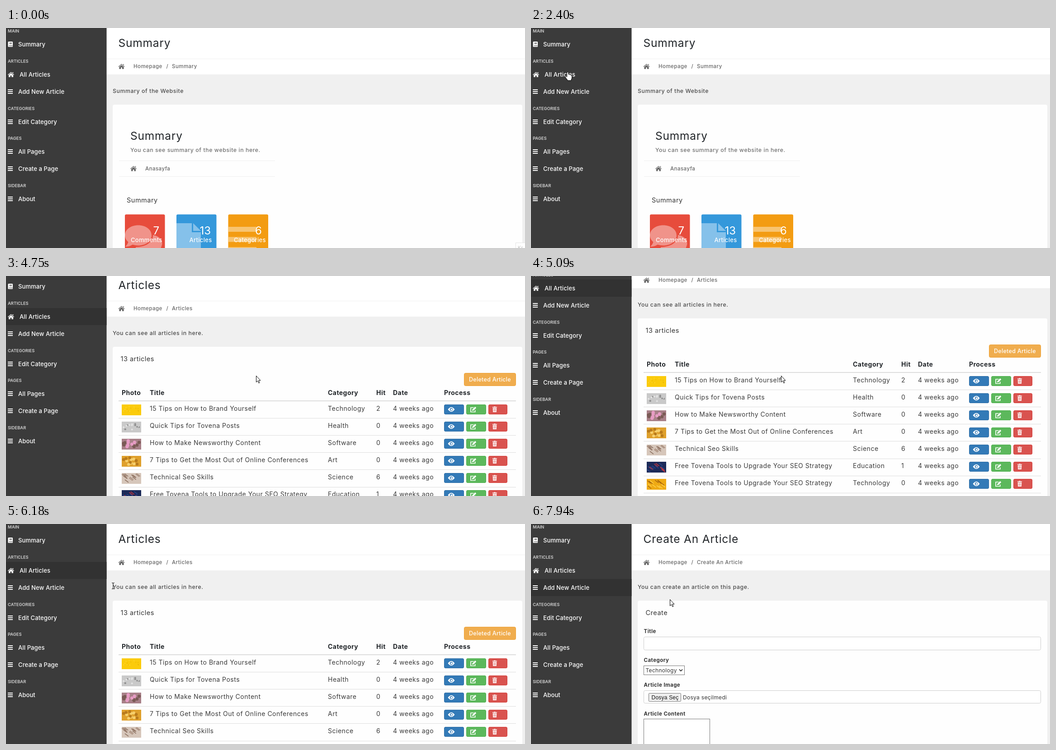
An HTML page that plays this animation: 1148 px wide and 488 px high, repeating every 8 s.

```html
<!DOCTYPE html>
<html lang="en">
<head>
<meta charset="utf-8">
<title>Article admin panel</title>
<style>
html, body { margin: 0; width: 100%; height: 100%; overflow: hidden; background: #f0f0f0; }
svg { display: block; }
text { font: 500 12.3px Inter, "Open Sans", sans-serif; letter-spacing: .57px; fill: #4a4a4a; }
.head { font-size: 24.5px; font-weight: 400; letter-spacing: .8px; fill: #212529; }
.crumb { font-size: 11.5px; letter-spacing: .45px; fill: #666; }
.sub { fill: #707070; }
.panel { font-size: 14.5px; font-weight: 400; letter-spacing: .5px; fill: #333; }
.nav { font-size: 13px; letter-spacing: .1px; fill: #fff; }
.group { font-size: 9.4px; font-weight: 600; letter-spacing: 0; fill: #d2d2d2; }
.count { font-size: 24px; font-weight: 400; letter-spacing: 0; fill: #fff; }
.tile { font-size: 13px; letter-spacing: .3px; fill: #fff; }
.btn { font-size: 12.5px; letter-spacing: .3px; fill: #fff; }
.th { font-size: 14px; font-weight: 700; letter-spacing: .45px; fill: #212529; }
.td { font-size: 14px; font-weight: 400; letter-spacing: .52px; fill: #3a3a3a; }
.label { font-size: 11.5px; font-weight: 700; letter-spacing: .45px; fill: #333; }
.field { font-size: 12px; font-weight: 400; letter-spacing: .3px; fill: #333; }
.file { font: 12px "Liberation Sans", Arial, sans-serif; letter-spacing: .2px; fill: #111; }
.faint { font-size: 10px; fill: #c8c8c8; }
.end { text-anchor: end; }
.mid { text-anchor: middle; }
</style>
</head>
<body>
<svg id="stage" width="1148" height="488" viewBox="0 0 1148 488"></svg>
<script>
const text = (cls, x, y, s) => `<text class="${cls}" x="${x}" y="${y}">${s}</text>`;
const rect = (x, y, w, h, fill, more = '') =>
  `<rect x="${x}" y="${y}" width="${w}" height="${h}" fill="${fill}" ${more}/>`;
const box = (x, y, w, h, stroke, r = 0, fill = '#fff') =>
  rect(x + .5, y + .5, w - 1, h - 1, fill, `stroke="${stroke}" rx="${r}"`);
const path = (d, fill, x = 0, y = 0, more = '') =>
  `<path d="${d}" fill="${fill}" transform="translate(${x} ${y})" ${more}/>`;
const group = (id, body) => `<g id="${id}">${body}</g>`;

const HOME = 'M0 6.4L7 .4L14 6.4L13.2 7.4L7 2.1L.8 7.4ZM10.4 1h1.8v2.8l-1.8-1.5ZM2 7.5L7 3.2L12 7.5V12H8.4V8.6H5.6V12H2Z';
const bars = y => [-5, -1, 3].map(d => rect(4, Math.floor(y) + d, 11, 2, '#fff')).join('');

// Sidebar
const links = [
  [36, 'Summary'], [103, 'All Articles'], [141, 'Add New Article'], [208, 'Edit Category'],
  [274.5, 'All Pages'], [312.5, 'Create a Page'], [379, 'About']
];
const groups = [[7, 'MAIN'], [74, 'ARTICLES'], [178.5, 'CATEGORIES'], [245, 'PAGES'], [350, 'SIDEBAR']];

function linkIcon(i, y) {
  if (i === 0) return rect(4.5, 30, 10.5, 12, '#fff', 'rx="1.5"') +
    rect(7.5, 32.5, 5.5, 1, '#3b3b3b') + rect(7.5, 34.5, 5.5, 1, '#3b3b3b') + rect(6.5, 39, 8, 1, '#3b3b3b');
  return i === 1 ? path(HOME, '#fff', 4, 97) : bars(y);
}

const sidebar = rect(0, 0, 222.5, 700, '#3b3b3b') +
  '<rect id="active" width="222.5" height="38" fill="#323232"/>' +
  groups.map(([y, s]) => text('group', 4, y + 3.4, s)).join('') +
  links.map(([y, s], i) => linkIcon(i, y) + text('nav', i === 1 ? 30 : 27, y + 4.6, s)).join('');

// Parts shared by every page
const frame = (title, intro) =>
  rect(222, 0, 926, 103, '#fff') + rect(222, 68, 926, 1, '#f0f0f0') +
  text('head', 248.5, 41.5, title) + path(HOME, '#666', 248.5, 79) +
  text('crumb', 282, 89.4, 'Homepage') + text('crumb', 354.5, 89.4, '/') + text('crumb', 367, 89.4, title) +
  text('', 236, 144.2, intro) + rect(236, 170, 906, 700, '#fefefe', 'rx="4"');

// Summary page
const tile = (x, color, icon, countX, count, labelX, label) =>
  rect(x, 413.5, 88.5, 90, color, 'rx="3"') + icon +
  text('count end', countX, 457.5, count) + text('tile', labelX, 474.5, label);

const pale = 'opacity=".4"';
const bubbles = `<g clip-path="url(#clip)" fill="#fff" ${pale}>
  <path d="M263 460C263 447 276 437.500 292.500 437.500S322 447 322 460S309 482.500 292.500 482.500Q286 482.500 280 480.500Q273 485 264 485Q269 480 270.500 475Q263 468 263 460Z"/>
  <path d="M325 459C340 462 347 471 345 481L342 490H287V486C309 486 326 475 325 459Z"/></g>`;
const sheet = path('M377 433H411V453H431V490H377ZM414 433L431 450H414Z', '#fff', 0, 0, pale);
const stripes = [441, 463.5, 486].map(y => rect(492, y, 62, 11, '#fff', pale)).join('');

const summary = frame('Summary', 'Summary of the Website') +
  text('head', 275, 247.5, 'Summary') +
  text('sub', 275, 275.2, 'You can see summary of the website in here.') +
  rect(250, 294, 345, 1, '#efefef') + rect(250, 329, 345, 1, '#efefef') +
  path(HOME, '#666', 275, 305.5) + text('crumb', 308, 315.8, 'Anasayfa') +
  text('panel', 267, 387.2, 'Summary') +
  tile(263, '#e74c3c', bubbles, 339, 7, 276, 'Comments') +
  tile(377, '#3498db', sheet, 453, 13, 405.5, 'Articles') +
  tile(491.5, '#f39c12', stripes, 566, 6, 504, 'Categories');

// Articles page: title, category, hits, thumbnail colours (base, two accents)
const rows = [
  ['15 Tips on How to Brand Yourself', 'Technology', 2, '#fbcb0b', '#e9b504', '#ffd93a'],
  ['Quick Tips for Tovena Posts', 'Health', 0, '#c9c9c9', '#8f8f8f', '#e4e4e4'],
  ['How to Make Newsworthy Content', 'Software', 0, '#a88088', '#e79cc4', '#7a5a55'],
  ['7 Tips to Get the Most Out of Online Conferences', 'Art', 0, '#dfa02c', '#f6cf6c', '#b87a1c'],
  ['Technical Seo Skills', 'Science', 6, '#d6c6ba', '#8c7060', '#a58a7a'],
  ['Free Tovena Tools to Upgrade Your SEO Strategy', 'Education', 1, '#1c2a58', '#c0373f', '#28468c'],
  ['Free Tovena Tools to Upgrade Your SEO Strategy', 'Technology', 0, '#efaa14', '#a8660f', '#ffd04a'],
  ['Smart Tips to Reduce Bounce Rate', 'Health', 0, '#efe6d2', '#f4b90a', '#f4b90a']
];

function thumb(i, y, [base, a, b]) {
  let seed = i * 37 + 5;
  const rnd = () => (seed = seed * 16807 % 2147483647) / 2147483647;
  let out = rect(256, y, 43, 24, base);
  const thin = i > 3;
  if (i === 7) return out + path('M5 11L25 5Q39 5 41 14Q39 21 30 20L7 17Z', a, 256, y) +
    path('M27 18L33 12L36 19Z', '#3d3322', 256, y);
  for (let k = 0; k < 14; k++) {
    const x = 260 + rnd() * 35, cy = y + 4 + rnd() * 16, c = k % 2 ? a : b;
    out += thin
      ? `<path d="M${x - 4} ${cy - 3}l8 6" stroke="${c}" stroke-width="1.6"/>`
      : `<circle cx="${x}" cy="${cy}" r="${[1, 2, 3.6, 3.2][i]}" fill="${c}"/>`;
  }
  return out;
}

const eye = (x, y) => path('M-7.5 0Q0-10 7.5 0Q0 10-7.5 0Z', '#fff', x, y) +
  `<circle cx="${x}" cy="${y}" r="3.2" fill="#337ab7"/><circle cx="${x + .4}" cy="${y + .2}" r="2" fill="#fff"/>`;
const pencil = (x, y) =>
  path('M1-4H-5.5V5.5H4.2V1.5', 'none', x, y, 'stroke="#fff" stroke-width="1.7"') +
  path('M-2.5 3L-2 .2L4.2-6L6.8-3.4L.6 2.6Z', '#fff', x, y);
const trash = (x, y) => path('M-5-5.5H-2L-1.3-6.5H1.3L2-5.5H5V-4H-5ZM-4.3-3H4.3L3.8 6H-3.8Z', '#fff', x, y) +
  [-2, 0, 2].map(d => rect(x + d - .4, y - 1.5, .8, 6, '#d9534f')).join('');

function articleRow([title, category, hits, ...colors], i) {
  const y = 306.6 + 38.1 * i, base = y + 5, by = Math.round(y - 9);
  return thumb(i, by, colors) +
    text('td', 318, base, title) + text('td', 712, base, category) +
    text('td', 819, base, hits) + text('td', 856, base, '4 weeks ago') +
    box(969, by, 44, 22, '#2e6da4', 2.5, '#337ab7') + eye(985, by + 11) +
    box(1018, by, 44, 22, '#4cae4c', 2.5, '#5cb85c') + pencil(1033.5, by + 11) +
    box(1067, by, 42, 22, '#d43f3a', 2.5, '#d9534f') + trash(1081, by + 11) +
    rect(249, Math.round(y + 21.5), 879, 1, '#ddd');
}

const heads = [[256, 'Photo'], [318, 'Title'], [712, 'Category'], [819, 'Hit'], [856, 'Date'], [969, 'Process']];
const articles = frame('Articles', 'You can see all articles in here.') +
  text('panel', 253.5, 202, '13 articles') +
  box(1013, 228, 115, 29, '#eea236', 3, '#f0ad4e') + text('btn mid', 1070.5, 247.2, 'Deleted Article') +
  heads.map(([x, s]) => text('th', x, 277, s)).join('') +
  rect(249, 289, 879, 2, '#ddd') + rows.map(articleRow).join('');

// Form page
const create = frame('Create An Article', 'You can create an article on this page.') +
  text('panel', 253.5, 202, 'Create') +
  text('label', 249.5, 242.2, 'Title') + box(249, 250, 879, 30, '#ccc', 3) +
  text('label', 249.5, 306.2, 'Category') + box(249, 314, 91, 21, '#767676') +
  text('field', 253.5, 328.8, 'Technology') +
  path('M0 0L3.5 3.5L7 0', 'none', 328, 322.5, 'stroke="#222" stroke-width="1.7"') +
  text('label', 249.5, 361.2, 'Article Image') + box(249, 369, 879, 29, '#ccc', 3) +
  box(260, 375, 72, 19, '#767676', 1, '#efefef') + text('file mid', 296.5, 388.6, 'Dosya Seç') +
  text('field', 336, 388.6, 'Dosya seçilmedi') +
  text('label', 249.5, 424.6, 'Article Content') + box(249, 432, 147, 100, '#767676');

// Cursors, each with its hot spot at 0,0
const outline = 'stroke="#000" stroke-linejoin="round"';
const cursors =
  group('arrow', path('M.5.5V14.5L3.7 11.6L6 16.6L8 15.7L5.8 10.8H10Z', '#fff', 0, 0, outline)) +
  group('hand', path('M-1.5 2Q0-1 2 2V6Q4 5 5 7Q7 6 8 8Q9.500 8 9.500 10V14Q9 16 8 17V19.500H-.5V18Q-4 14-5.500 11Q-5 8.500-1.500 11.500Z', '#fff', 0, 0, outline)) +
  group('ibeam', path('M-3-6.500Q0-6.500 0-5Q0-6.500 3-6.500M0-5V6M-3 7Q0 7 0 5.500Q0 7 3 7', 'none', 0, 0, 'stroke="#222" stroke-width="1.2"'));

const stage = document.getElementById('stage');
stage.innerHTML = '<clipPath id="clip"><rect x="263" y="413" width="88.500" height="90"/></clipPath>' +
  rect(0, 0, 1148, 488, '#f0f0f0') +
  group('view', group('summary', summary) + group('articles', articles) + group('create', create) + sidebar) +
  group('hint', box(1127, 476, 40, 30, '#e4e4e4') + text('faint', 1132, 491, 'Kr')) +
  group('cursor', cursors);

const el = id => document.getElementById(id);
const show = (id, on) => { el(id).style.display = on ? '' : 'none'; };

// Keyframes: time, then values
const pointer = [
  [70, 1130, 470], [770, 438, 163], [1230, 200, 14], [1440, 122, 35], [1650, 84, 30],
  [2070, 81, 97], [3740, 81, 97], [4220, 553, 221], [5830, 553, 221], [6180, 237, 137],
  [6470, 174, 148], [6680, 174, 142], [7730, 174, 142], [7940, 307, 167]
];
const scroll = [[4680, 0], [5100, 76], [5230, 114], [5680, 114], [5690, 112], [6040, 0]];
const bursts = [0, 70, 880, 1720, 3740, 4680, 5690, 6540, 7470, 7730];

function at(keys, t) {
  const i = keys.findIndex(k => k[0] > t);
  if (i < 0) return keys[keys.length - 1].slice(1);
  if (i === 0) return keys[0].slice(1);
  const a = keys[i - 1], b = keys[i], p = (t - a[0]) / (b[0] - a[0]);
  return a.slice(1).map((v, k) => v + (b[k + 1] - v) * p);
}

function snap(t) {
  const start = bursts.filter(b => b <= t).pop();
  return start + Math.floor((t - start + 12) / 70) * 70;
}

function draw() {
  const t = snap(performance.now() % 8000);
  const [x, y] = at(pointer, t).map(Math.round);
  const page = t >= 7800 ? 'create' : t >= 3810 ? 'articles' : 'summary';
  for (const id of ['summary', 'articles', 'create']) show(id, id === page);
  show('active', t >= 3740);
  el('active').setAttribute('y', t >= 7730 ? 122 : 84);
  el('view').setAttribute('transform', `translate(0 ${-Math.round(at(scroll, t)[0])})`);

  const overLink = x < 223 && t < 7470 && links.some(([ly]) => Math.abs(y - ly) < 19);
  const overText = x > 230 && x < 434 && y > 130 && y < 150 && t > 5690;
  const kind = overLink ? 'hand' : overText ? 'ibeam' : 'arrow';
  for (const id of ['arrow', 'hand', 'ibeam']) show(id, id === kind);
  el('cursor').setAttribute('transform', `translate(${x} ${y})`);
  show('cursor', t >= 70);
  show('hint', t < 70);
  requestAnimationFrame(draw);
}
draw();
</script>
</body>
</html>
```
